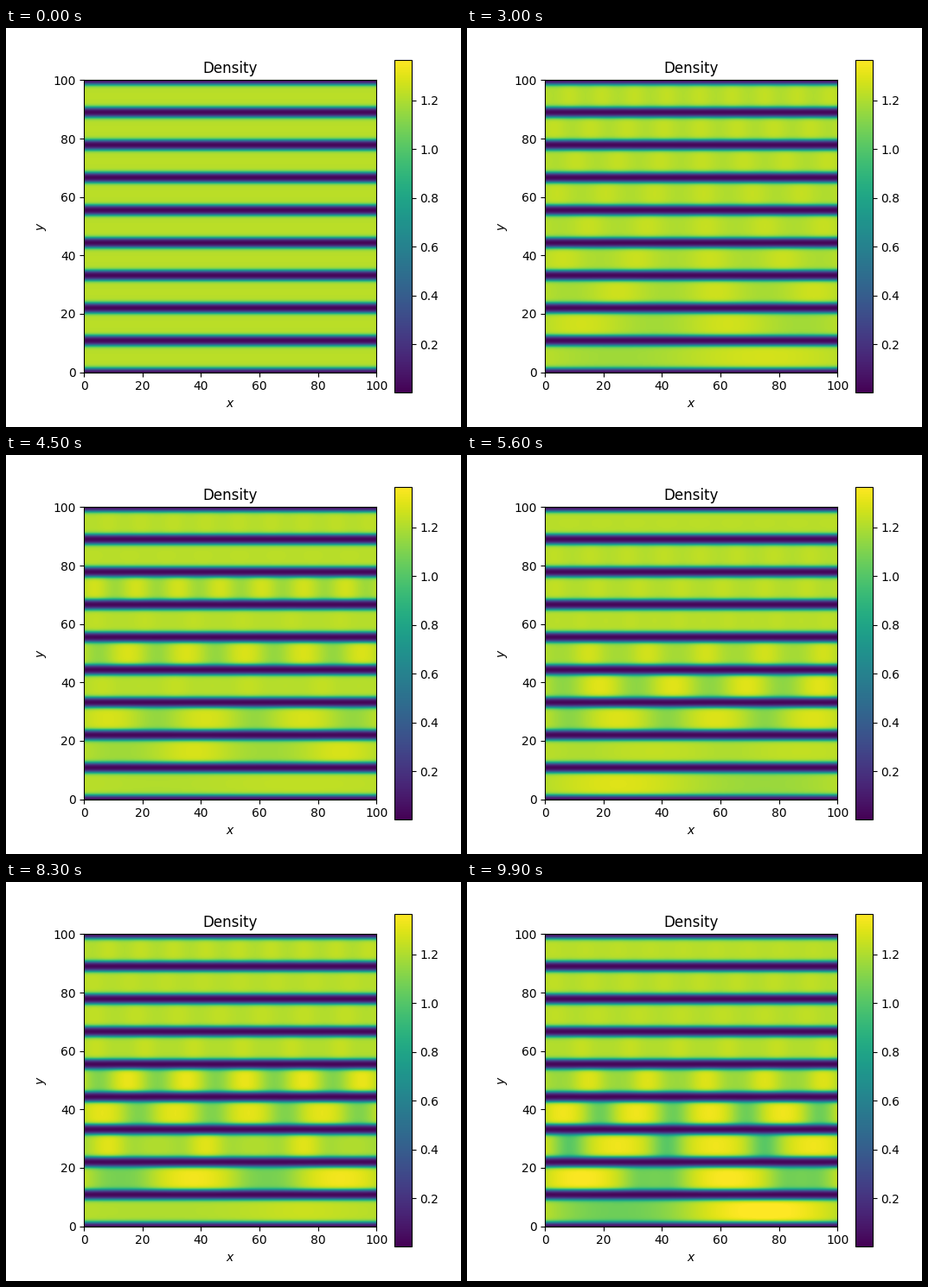
A matplotlib script that plays this animation: 526x462 px, repeating every 10 s.

```python
import numpy as np
import matplotlib.pyplot as plt
from matplotlib.animation import FuncAnimation

W, H, DPI = 526, 462, 100
FRAMES, INTERVAL = 100, 100
L, N, CHANNELS = 100.0, 128, 9
RHO0 = 1.222

# Units: x in axis units, t in seconds
C = L / 6.6            # sound speed
XI = 1.95              # healing length
D = C * XI             # dispersion, hbar / m
MU = C / XI            # interaction energy at the background density
DRIVE = 0.029 * MU
SUBSTEPS = 20


def simulate():
    """Density along each channel, driven by a standing wave with n periods."""
    x = np.arange(N) * L / N
    q = 2 * np.pi * np.fft.fftfreq(N, L / N)
    n = np.arange(1, CHANNELS + 1)[:, None]
    k = 2 * np.pi * n / L
    wave = DRIVE / n * np.sin(k * x)   # same peak force for every n
    dt = INTERVAL / 1000 / SUBSTEPS
    kinetic = np.exp(-0.5j * D * q**2 * dt)
    psi = np.ones((CHANNELS, N), complex)
    out = []
    t = 0.0
    for _ in range(FRAMES):
        out.append(np.abs(psi) ** 2)
        for _ in range(SUBSTEPS):
            trap = wave * np.sin(C * k * (t + dt / 2))
            for half in range(2):
                pot = MU * (np.abs(psi) ** 2 - 1) + trap
                psi = psi * np.exp(-0.5j * dt * pot)
                if half == 0:
                    psi = np.fft.ifft(kinetic * np.fft.fft(psi, axis=1), axis=1)
            t += dt
    rho = np.array(out)
    return np.concatenate([rho, rho[:, :, :1]], axis=2)


def px_axes(x, y, w, h):
    return fig.add_axes([x / W, y / H, w / W, h / H])


rho = simulate()

# Walls between the channels
PITCH, SHIFT = 11.14, 0.2
y = np.linspace(0, L, 339)
row = np.clip((y + SHIFT) // PITCH, 0, CHANNELS - 1).astype(int)
phase = (y + SHIFT) % PITCH
dist = np.minimum(phase, PITCH - phase)
profile = RHO0 / (1 + np.exp(-(dist - 1.58) / 0.38))


def density(i):
    return profile[:, None] * rho[i][row]


fig = plt.figure(figsize=(W / DPI, H / DPI), dpi=DPI)
ax = px_axes(90.2, 63.4, 338.2, 338.2)
hx, hy = L / N / 2, L / 338 / 2
im = ax.imshow(density(0), origin="lower", aspect="auto", cmap="viridis",
               vmin=0.003, vmax=1.365, interpolation="bilinear",
               extent=(-hx, L + hx, -hy, L + hy))
ax.set(xlim=(0, L), ylim=(0, L), title="Density", xlabel="$x$", ylabel="$y$",
       xticks=range(0, 101, 20), yticks=range(0, 101, 20))
fig.colorbar(im, cax=px_axes(449.3, 40, 19.25, 385),
             ticks=np.arange(1, 7) * 0.2)


def update(i):
    im.set_data(density(i))
    return [im]


anim = FuncAnimation(fig, update, frames=FRAMES, interval=INTERVAL,
                     repeat=True, repeat_delay=0, blit=False)
plt.show()
```
